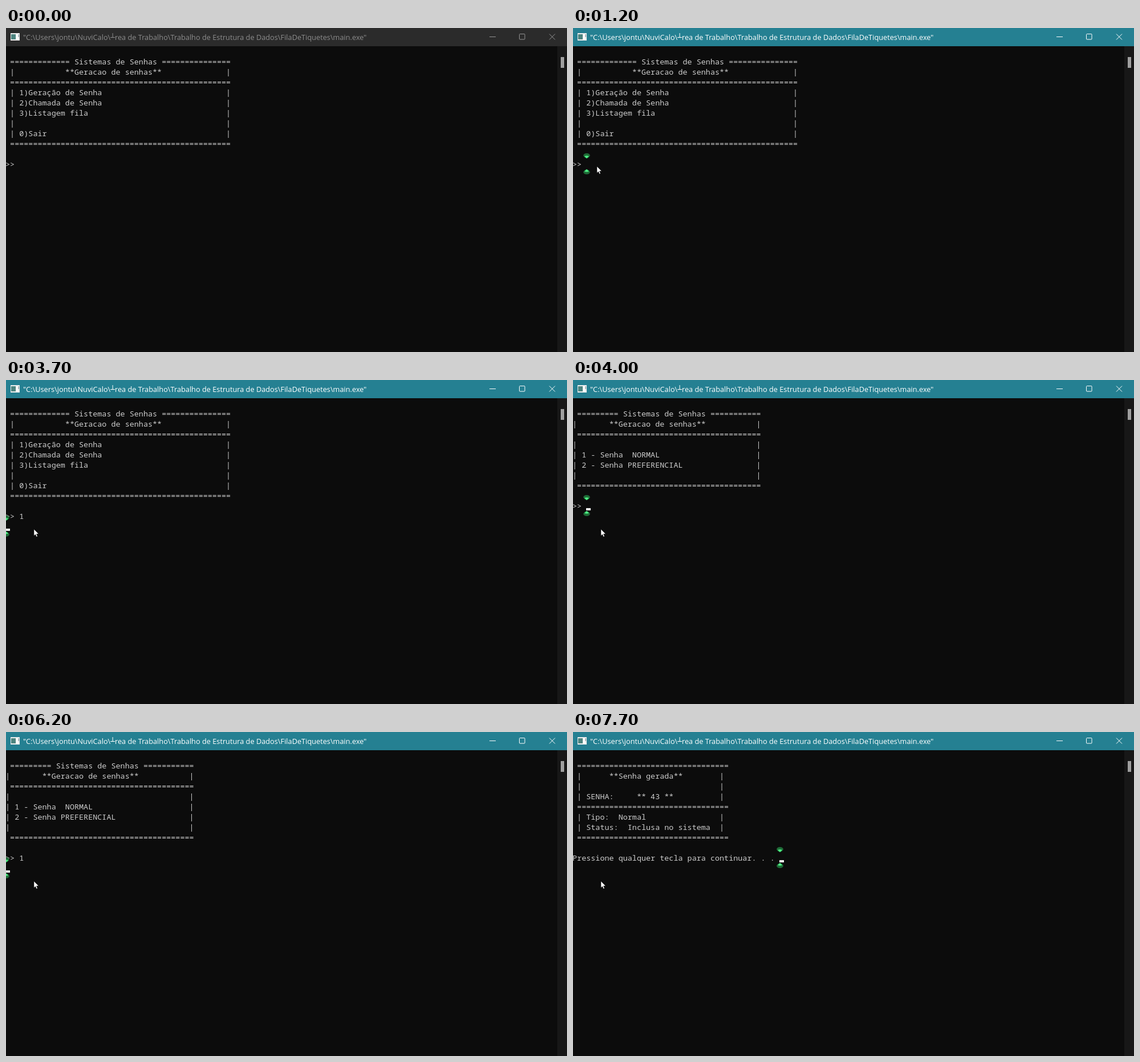
Write an HTML page that moves like this. It is 984 by 569 pixels and loops after 8 s.

```html
<!DOCTYPE html>
<html lang="pt">
<head>
<meta charset="utf-8">
<title>Painel</title>
<style>
  html, body { margin: 0; width: 100%; height: 100%; overflow: hidden; background: #0c0c0c; }
  svg { display: block; width: 984px; height: 569px; }
  text { white-space: pre; }
  .title { font: 12.75px "Open Sans", "DejaVu Sans Mono", sans-serif; fill: #8c8c8c; }
  .console text { font: 13.44px "Noto Sans Mono", "DejaVu Sans Mono", monospace; fill: #ccc; }
  .bar { fill: #2b2b2b; }
  .buttons { fill: none; stroke: #959595; stroke-width: 1; }
  .active .bar { fill: #258092; }
  .active .title { fill: #fff; }
  .active .buttons { stroke: #fff; }
</style>
</head>
<body>
<svg id="stage" viewBox="0 0 984 569">
  <rect width="984" height="569" fill="#0c0c0c"/>
  <rect x="967" y="32" width="17" height="537" fill="#171717"/>
  <rect x="973" y="51" width="6" height="19" fill="#9f9f9f"/>

  <rect class="bar" width="984" height="32"/>
  <rect x="8" y="9" width="16" height="13" fill="#eee"/>
  <rect x="9" y="11" width="8" height="9" fill="#4d8580"/>
  <rect x="18" y="11" width="3" height="9" fill="#fff"/>
  <rect x="21.5" y="11" width="1.2" height="5" fill="#7b8f98"/>
  <text class="title" x="30" y="20.5">"C:\Users\jontu\NuviCalo\┴rea de Trabalho\Trabalho de Estrutura de Dados\FilaDeTiquetes\main.exe"</text>
  <g class="buttons">
    <path d="M848 15.5H859"/>
    <rect x="900.5" y="10.5" width="9.5" height="9.5" rx="1"/>
    <path d="M953 10.5L963 20.5M963 10.5L953 20.5"/>
  </g>

  <g class="console" id="console"></g>
  <rect id="caret" width="8" height="4" fill="#f4f4f4"/>
  <g id="handles">
    <g id="lens">
      <path d="M-6 -14.5Q-5 -18.5 0 -18.5Q5 -18.5 6 -14.5Q4 -10.5 0 -9.8Q-4 -10.5 -6 -14.5Z" fill="#1f6b37"/>
      <path d="M-4 -13.2Q0 -15.2 4 -13.2L0 -9.5Z" fill="#4df184"/>
    </g>
    <use href="#lens" transform="scale(1 -1)"/>
  </g>
  <path id="mouse" d="M0 0V11.6L2.6 9.2L4.4 13.4L6.3 12.6L4.5 8.5L8.2 8.2Z" fill="#fff" stroke="#000" stroke-width=".5"/>
</svg>
<script>
const LOOP = 8000;
const CELL_W = 8.064, CELL_H = 17.95, LEFT = -1, TOP = 31.6, BASELINE = 14.5;
const byId = id => document.getElementById(id);
const colX = col => LEFT + col * CELL_W;
const rowY = row => TOP + row * CELL_H;

const rule = n => ' ' + '='.repeat(n);
const boxed = (left, right, body = '') => (' '.repeat(left) + '|' + body).padEnd(right) + '|';

// Lines of each screen, starting at row 1
const wide = body => boxed(1, 48, body);
const mid = body => boxed(0, 40, body);
const slim = body => boxed(1, 32, body);
const screens = [
  [
    rule(13) + ' Sistemas de Senhas ' + '='.repeat(15),
    wide(' '.repeat(11) + '**Geracao de senhas**'),
    rule(48),
    wide(' 1)Geração de Senha'),
    wide(' 2)Chamada de Senha'),
    wide(' 3)Listagem fila'),
    wide(),
    wide(' 0)Sair'),
    rule(48),
    '',
    '>> '
  ],
  [
    rule(9) + ' Sistemas de Senhas ' + '='.repeat(11),
    mid(' '.repeat(7) + '**Geracao de senhas**'),
    rule(40),
    mid(),
    mid(' 1 - Senha  NORMAL'),
    mid(' 2 - Senha PREFERENCIAL'),
    mid(),
    rule(40),
    '',
    '>> '
  ],
  [
    rule(33),
    slim(' '.repeat(6) + '**Senha gerada**'),
    slim(),
    slim(' SENHA:     ** 43 **'),
    rule(33),
    slim(' Tipo:  Normal'),
    slim(' Status:  Inclusa no sistema'),
    rule(33),
    '',
    'Pressione qualquer tecla para continuar. . . '
  ]
];

// caret and handles are [column, row]; mouse is the pointer tip in pixels
const start = { screen: 0, typed: '', active: false, caret: null, handles: null, mouse: null };
const steps = [
  [100, { mouse: [58, -4] }],
  [200, { mouse: [62, 70] }],
  [300, { mouse: [56, 150] }],
  [400, { mouse: [40, 232] }],
  [500, { mouse: [22, 300] }],
  [600, { mouse: [17, 327] }],
  [700, { mouse: [27, 302] }],
  [800, { mouse: [37, 270] }],
  [900, { mouse: [41, 249] }],
  [1000, { mouse: [42, 243] }],
  [1200, { active: true, handles: [3, 11] }],
  [1400, { mouse: [45, 260] }],
  [1600, { mouse: [49, 261] }],
  [1800, { caret: [3, 11] }],
  [2000, { mouse: [49, 262] }],
  [2200, { caret: null }],
  [2500, { typed: '1', caret: [4, 11], handles: [4, 11] }],
  [2700, { caret: null }],
  [3000, { caret: [0, 12] }],
  [3200, { caret: null, handles: [0, 12] }],
  [3700, { caret: [0, 12] }],
  [3900, { screen: 1, typed: '', caret: [3, 10] }],
  [4000, { handles: [3, 10] }],
  [4700, { caret: null }],
  [5100, { typed: '1', caret: [4, 10], handles: [4, 10] }],
  [5200, { caret: null }],
  [5600, { caret: [0, 11] }],
  [5700, { caret: null, handles: [0, 11] }],
  [6200, { caret: [0, 11] }],
  [6500, { screen: 2, typed: '', caret: [45, 10] }],
  [6600, { handles: [45, 10] }],
  [7200, { caret: null }],
  [7700, { caret: [45, 10] }]
];

function addText(parent, line, row) {
  const el = document.createElementNS('http://www.w3.org/2000/svg', 'text');
  el.setAttribute('x', LEFT);
  el.setAttribute('y', rowY(row) + BASELINE);
  el.textContent = line;
  parent.append(el);
}

function drawConsole({ screen, typed }) {
  const box = byId('console'), lines = screens[screen];
  box.replaceChildren();
  lines.forEach((line, i) => {
    const last = i === lines.length - 1;
    if (line) addText(box, last ? line + typed : line, i + 1);
  });
}

function place(id, point) {
  const el = byId(id);
  el.style.display = point ? '' : 'none';
  if (point) el.setAttribute('transform', `translate(${point})`);
}

let shown = -1;
function render(time) {
  const count = steps.filter(([at]) => at <= time).length;
  if (count === shown) return;
  shown = count;
  const state = Object.assign({}, start, ...steps.slice(0, count).map(s => s[1]));
  const { caret, handles } = state;
  byId('stage').classList.toggle('active', state.active);
  drawConsole(state);
  place('caret', caret && [Math.round(colX(caret[0])), Math.round(rowY(caret[1] + 1)) - 4]);
  place('handles', handles && [Math.round(colX(handles[0])) + 1, rowY(handles[1]) + 9.4]);
  place('mouse', state.mouse);
}

function tick() {
  render(performance.now() % LOOP);
  requestAnimationFrame(tick);
}
tick();
</script>
</body>
</html>
```
